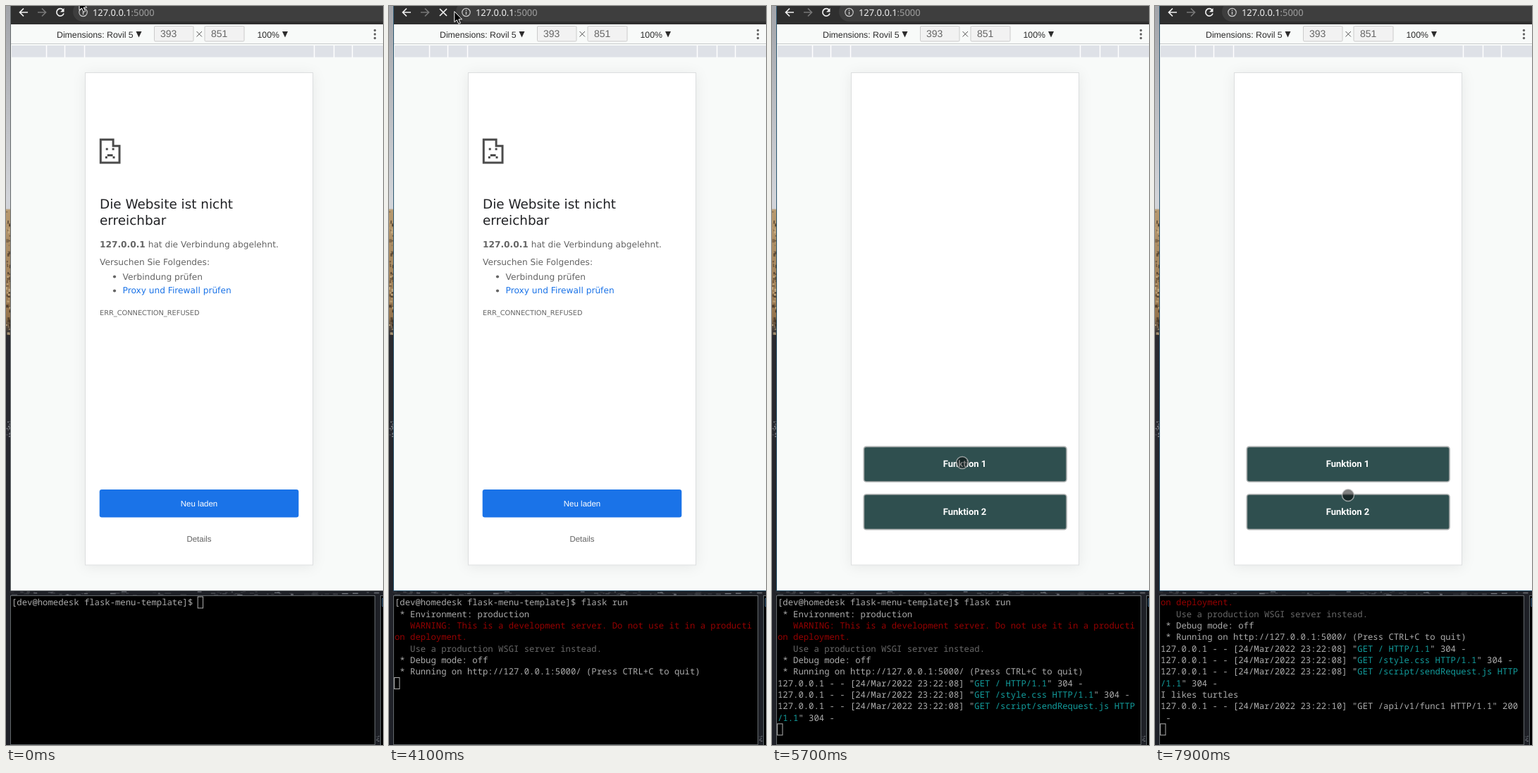
Write an HTML page that moves like this. It is 535x1047 px and loops after 8 s.

```html
<!DOCTYPE html>
<html lang="de">
<head>
<meta charset="utf-8">
<title>Flask menu demo</title>
<style>
  html, body { margin: 0; width: 100%; height: 100%; overflow: hidden; background: #1c1f26; }
  svg { display: block; width: 100vw; height: 100vh; }
  text { white-space: pre; text-rendering: geometricPrecision; }
  .ui { font-family: "Liberation Sans", Arial, sans-serif; }
  .page { font: 12.2px "DejaVu Sans", sans-serif; fill: #646464; }
  .menu { font: bold 13px Roboto, sans-serif; fill: #fff; text-anchor: middle; }
  .term { font: 12.25px "Noto Sans Mono", monospace; fill: #acacac; }
  .warn { fill: #960000; }
  .dim { fill: #686868; }
  .get { fill: #129c9c; }
  .icon { fill: none; stroke: #f1f1f1; stroke-width: 1.7; }
</style>
</head>
<body>
<svg viewBox="0 0 535 1047" preserveAspectRatio="none">
  <defs>
    <linearGradient id="wall" x2="0" y2="1">
      <stop offset="0" stop-color="#a2a4a9"/>
      <stop offset=".26" stop-color="#d2d4d9"/>
      <stop offset=".274" stop-color="#d2d4d9"/>
      <stop offset=".276" stop-color="#b89a70"/>
      <stop offset=".42" stop-color="#96754e"/>
      <stop offset=".445" stop-color="#2a2a30"/>
      <stop offset="1" stop-color="#1e2027"/>
    </linearGradient>
    <filter id="shadow" x="-15%" y="-10%" width="130%" height="120%">
      <feDropShadow dx="0" dy="2" stdDeviation="9" flood-opacity=".07"/>
    </filter>
  </defs>

  <rect width="535" height="1047" fill="#1e2026"/>
  <rect width="6" height="1047" fill="url(#wall)"/>
  <g id="flecks"></g>

  <!-- browser chrome -->
  <rect x="7" width="528" height="828" fill="#f8faf9"/>
  <rect x="7" width="528" height="26" fill="#2f2f2f"/>
  <rect x="95" y="-6" width="500" height="28" rx="14" fill="#3e3e3e"/>
  <path class="icon" d="M31 9H20M25 3.5L19.5 9L25 14.5"/>
  <path class="icon" style="stroke:#777" d="M45 9H56M51 3.5L56.5 9L51 14.5"/>
  <g id="reload">
    <path class="icon" d="M81 5.5A5.2 5.2 0 1 0 82 10.5"/>
    <path d="M82.5 3V8.5H77z" fill="#f1f1f1"/>
  </g>
  <path id="stop" class="icon" d="M72 4L82 14M82 4L72 14"/>
  <circle class="icon" cx="109.5" cy="9" r="5.7" style="stroke:#c8c8c8;stroke-width:1.2"/>
  <path d="M109.5 8v4.3M109.5 5.5v1.5" stroke="#c8c8c8" stroke-width="1.4"/>
  <text x="123" y="13.5" font-size="12.9" font-family="Noto Sans, sans-serif" fill="#f0f0f0">127.0.0.1<tspan fill="#a0a0a0">:5000</tspan></text>

  <!-- device toolbar -->
  <path d="M7 53.5H535" stroke="#c9cccd"/>
  <g class="ui" font-size="12.3" fill="#2c2c2c">
    <text x="72" y="44.5">Dimensions: Rovil 5</text>
    <text x="356.5" y="44.5">100%</text>
    <path d="M184.5 36h8l-4 8.5zM392 36h8l-4 8.5z"/>
    <g fill="#f2f2f2" stroke="#cbcbcb">
      <rect x="210.5" y="28.5" width="55.5" height="21.5" rx="1.5"/>
      <rect x="282" y="28.5" width="56" height="21.5" rx="1.5"/>
    </g>
    <g font-size="14" fill="#666">
      <text x="219" y="44">393</text>
      <text x="291" y="44">851</text>
    </g>
    <path d="M270.5 36l7.5 7.5M278 36l-7.5 7.5" stroke="#555"/>
    <g fill="#666"><circle cx="523.5" cy="34.5" r="1.7"/><circle cx="523.5" cy="40" r="1.7"/><circle cx="523.5" cy="45.5" r="1.7"/></g>
  </g>
  <rect x="8" y="56" width="527" height="16.5" fill="#dee1e7"/>
  <path d="M57.5 56v17M83.5 56v17M111.5 56v17M437.5 56v17M465.5 56v17M491.5 56v17" stroke="#fff" stroke-width="1.5"/>
  <rect x="112.5" y="94.5" width="323" height="697.5" fill="#fff" stroke="#dcdedf" filter="url(#shadow)"/>

  <g id="error" class="page">
    <path transform="translate(132.8 187.8) scale(2.97)" fill="#4c4c4c" fill-rule="evenodd"
      d="M0 0H7V1H8V2H9V3H10V12H0zM1 1V11H9V4H6V1zM7 1V3H9V2H8V1zM3 4.5h1v1h-1zM6 4.5h1v1h-1zM3.7 7.5h2.6v1h1v1h-1v-1h-2.6v1h-1v-1h1z"/>
    <g font-size="18.4" fill="#202124">
      <text x="133" y="287">Die Website ist nicht</text>
      <text x="133" y="309.5">erreichbar</text>
    </g>
    <text x="133" y="342"><tspan font-weight="bold">127.0.0.1</tspan> hat die Verbindung abgelehnt.</text>
    <text x="133" y="367">Versuchen Sie Folgendes:</text>
    <circle cx="154" cy="383.5" r="2.1"/><circle cx="154" cy="403.5" r="2.1"/>
    <text x="165.5" y="387.5">Verbindung prüfen</text>
    <text x="165.5" y="407" fill="#1a73e8">Proxy und Firewall prüfen</text>
    <text x="133" y="438" font-size="9.8">ERR_CONNECTION_REFUSED</text>
    <rect x="132.7" y="685" width="282.6" height="39.5" rx="3.3" fill="#1a73e8"/>
    <g class="ui" font-size="11.5" text-anchor="middle">
      <text x="274" y="709" fill="#fff">Neu laden</text>
      <text x="274" y="758.5">Details</text>
    </g>
  </g>

  <g id="menu" class="menu">
    <g fill="#2f4f4f" stroke="#a9adad" stroke-width="1.7">
      <rect x="130.3" y="624.3" width="287.7" height="49.7" rx="3.5"/>
      <rect x="130.3" y="692" width="287.7" height="49.7" rx="3.5"/>
    </g>
    <text x="273.5" y="653.3">Funktion 1</text>
    <text x="273.5" y="721">Funktion 2</text>
    <rect id="tap" x="129.5" y="623.5" width="289.3" height="51.3" rx="4" fill="#33b5e5" fill-opacity=".4"/>
  </g>

  <path id="browserEdge" d="M6.5 0V828.5H535" fill="none"/>

  <!-- terminals -->
  <rect id="termEdge" x="6.5" y="835.5" width="517" height="211" fill="#000"/>
  <rect x="531.5" y="835.5" width="20" height="220" fill="#000" stroke="#5f676a"/>
  <path d="M535 839.5h-1v11h1" fill="none" stroke="#3c6c94"/>
  <g id="term" class="term"></g>
  <rect id="caret" width="7.35" height="16"/>

  <g id="pointer">
    <path id="arrow" d="M0 0v15l3.5-3 2.5 5.5 2.5-1-2.4-5.4h4.6z" stroke="#fff"/>
    <g id="beam" fill="none">
      <path d="M-3.5-7h2.5l1 1 1-1h2.5M0-6v12M-3.5 7h2.5l1-1 1 1h2.5" stroke="#000" stroke-width="3"/>
      <path d="M-3.5-7h2.5l1 1 1-1h2.5M0-6v12M-3.5 7h2.5l1-1 1 1h2.5" stroke="#e8e8e8" stroke-width="1.3"/>
    </g>
    <circle id="touch" r="8.5" stroke="#d4d4d4" stroke-opacity=".65" stroke-width="1.5"/>
  </g>
</svg>

<script>
const LOOP = 8000, STEP = 100;
const CELL = 7.35, LINE = 16.36, ROWS = 12;
const el = id => document.getElementById(id);
const show = (id, on) => el(id).style.display = on ? '' : 'none';
const span = (style, text) => `<tspan class="${style}">${text}</tspan>`;

const PROMPT = '[dev@homedesk flask-menu-template]$ ';
const COMMAND = 'flask run';
const stamp = second => `127.0.0.1 - - [24/Mar/2022 23:22:${second}] "`;
const BOOT = [
  ' * Environment: production',
  span('warn', '   WARNING: This is a development server. Do not use it in a producti'),
  span('warn', 'on deployment.'),
  span('dim', '   Use a production WSGI server instead.'),
  ' * Debug mode: off',
  ' * Running on http://127.0.0.1:5000/ (Press CTRL+C to quit)'
];
const LOADED = [
  stamp('08') + span('get', 'GET / HTTP/1.1') + '" 304 -',
  stamp('08') + span('get', 'GET /style.css HTTP/1.1') + '" 304 -',
  stamp('08') + span('get', 'GET /script/sendRequest.js HTTP'),
  span('get', '/1.1') + '" 304 -'
];
const CALLED = ['I likes turtles', stamp('10') + 'GET /api/v1/func1 HTTP/1.1" 200', ' -'];

// [time, characters typed]
const TYPING = [[0, 0], [1400, 1], [1500, 2], [1600, 4], [1800, 5], [1900, 6], [2100, 7], [2200, 8], [2300, 9]];
// [time, x, y, sideways bow on the way there]
const MOVES = [
  [0, 104, -9], [600, 293, 892], [3400, 293, 892], [3700, 78, 8], [4000, 78, 8],
  [4600, 278, 4], [5000, 278, 4], [5700, 270, 647, 10], [7400, 270, 647], [7900, 274, 693], [LOOP, 274, 693]
];

function pointerAt(t) {
  const i = MOVES.findIndex(m => m[0] > t);
  const [t0, x0, y0] = MOVES[i - 1], [t1, x1, y1, bow = 0] = MOVES[i];
  const u = (t - t0) / (t1 - t0), k = u * u * (3 - 2 * u);
  return [x0 + (x1 - x0) * k + bow * Math.sin(Math.PI * k), y0 + (y1 - y0) * k];
}

function drawTerminal(t, focused) {
  const typed = TYPING.filter(k => k[0] <= t).pop()[1];
  const lines = [PROMPT + COMMAND.slice(0, typed)];
  const column = t < 2900 ? lines[0].length : 0;
  if (t >= 2900) lines.push(...BOOT);
  if (t >= 4700) lines.push(...LOADED);
  if (t >= 6800) lines.push(...CALLED);
  if (t >= 2900) lines.push('');
  const view = lines.slice(-ROWS);
  el('term').innerHTML = view.map((s, i) => `<text x="8" y="${849.2 + i * LINE}">${s}</text>`).join('');

  const caret = el('caret');
  caret.setAttribute('x', 7.6 + column * CELL);
  caret.setAttribute('y', 837 + (view.length - 1) * LINE);
  caret.setAttribute('fill', focused ? '#adadad' : 'none');
  caret.setAttribute('stroke', focused ? 'none' : '#b0b0b0');
}

function drawPointer(x, y, pressed) {
  const inDevice = x > 113 && x < 435 && y > 95 && y < 792;
  const inText = y > 836 || (x > 96 && y > -6 && y < 22);
  el('pointer').setAttribute('transform', `translate(${x} ${y})`);
  show('touch', inDevice);
  show('beam', inText);
  show('arrow', !inDevice && !inText);
  el('touch').setAttribute('fill-opacity', pressed ? .65 : .5);
}

function draw(t) {
  const [x, y] = pointerAt(t);
  const inTerminal = y > 832;
  const inBrowser = t > 0 && !inTerminal;
  const edge = on => on ? '#2b5670' : '#62676a';
  el('termEdge').setAttribute('stroke', edge(inTerminal));
  el('browserEdge').setAttribute('stroke', edge(inBrowser));

  const loading = t >= 4100 && t < 4700, loaded = t >= 4700;
  show('stop', loading);
  show('reload', !loading);
  show('error', !loaded);
  show('menu', loaded);
  show('tap', t >= 6700 && t < 6900);
  drawTerminal(t, inTerminal);
  drawPointer(x, y, t === 6700);
}

// Rock texture in the visible slivers of wallpaper.
function drawFlecks() {
  let seed = 7;
  const rand = () => (seed = seed * 16807 % 2147483647) / 2147483647;
  const fleck = (x, y, w, h, color) =>
    `<rect x="${x}" y="${y}" width="${w}" height="${h}" fill="${color}" opacity="${.3 + rand() * .5}"/>`;
  let out = '';
  for (let i = 0; i < 60; i++) out += fleck(rand() * 5, 290 + rand() * 175, 1 + rand() * 3, 1 + rand() * 4, i % 3 ? '#3a2a1c' : '#e2c79a');
  for (let i = 0; i < 14; i++) out += fleck(rand() * 5, 588 + rand() * 30, 2, 1.5, '#a5a8ae');
  for (let i = 0; i < 70; i++) out += fleck(rand() * 535, 829 + rand() * 5, 2 + rand() * 7, 1 + rand(), i % 4 ? '#484a50' : '#8d9097');
  for (let i = 0; i < 12; i++) out += fleck(524 + rand() * 5, 1034 + rand() * 8, 2, 1, '#80848b');
  el('flecks').innerHTML = out;
}

let shown = -1;
function tick(now) {
  const t = Math.floor(now % LOOP / STEP) * STEP;
  if (t !== shown) draw(shown = t);
  requestAnimationFrame(tick);
}
drawFlecks();
draw(0);
requestAnimationFrame(tick);
</script>
</body>
</html>
```
